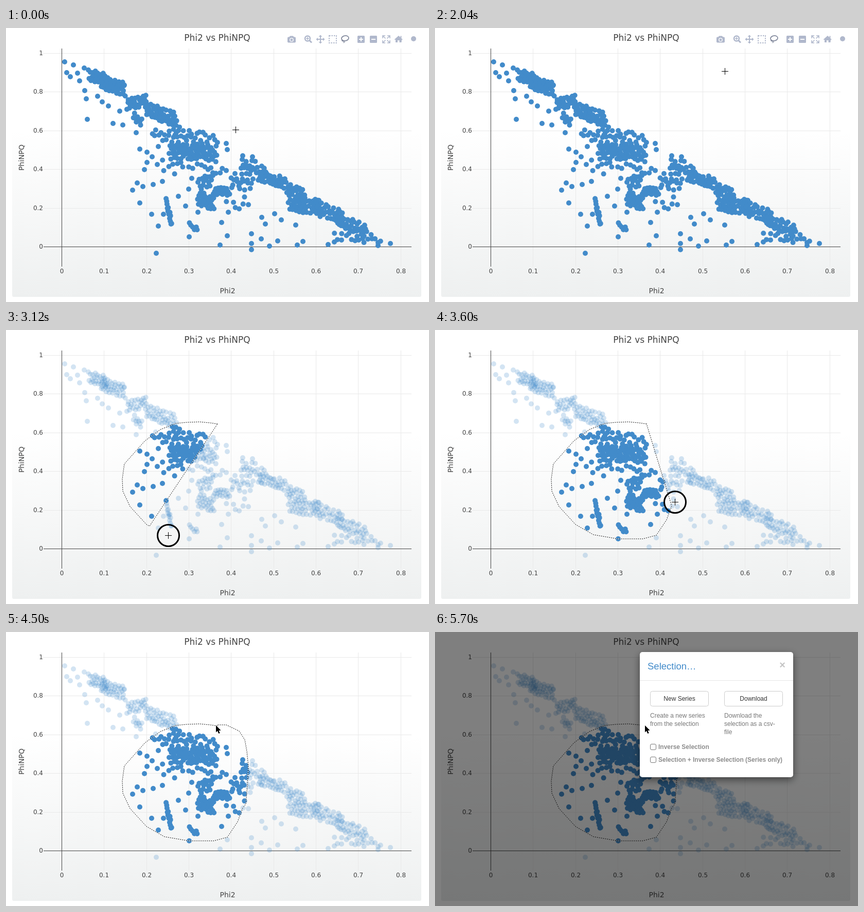
Recreate the animation shown at these times as an HTML page with a canvas. Size 822x534 px, loop 5.76 s.

```html
<!DOCTYPE html>
<html lang="en">
<head>
<meta charset="utf-8">
<title>Phi2 vs PhiNPQ</title>
<style>
  html, body { margin: 0; width: 100%; height: 100%; overflow: hidden; background: #fff; }
  canvas { display: block; }
</style>
</head>
<body>
<canvas id="stage" width="822" height="534"></canvas>
<script>
const ctx = document.getElementById('stage').getContext('2d');
const W = 822, H = 534, LOOP = 5760, STEP = 60;
const BLUE = '#428bca', ICON = '#b0b8cc', ICON_ON = '#858c9f';
const PLOT_FONT = '"DejaVu Sans", Verdana, sans-serif';
const UI_FONT = '"Liberation Sans", Arial, sans-serif';
const PRESS = 2460, DIM = 2520, RELEASE = 4260, DIALOG = 4560;

// isolated points: x, y
const loners = [
  114,66, 118,87, 125,95, 131,72, 139,88, 143,103, 152,78, 153,122, 156,138,
  158,178, 178,133, 187,144, 199,152, 208,186, 227,189, 221,162, 228,122,
  253,204, 260,236, 246,316, 255,302, 266,309, 260,341, 269,276, 274,242,
  274,262, 283,363, 292,439, 296,386, 286,305, 284,251, 296,231, 294,266,
  304,299, 306,363, 335,328, 349,347, 355,314, 356,407, 361,293, 373,359,
  416,423, 419,379, 430,405, 430,237, 428,225, 460,249, 479,251, 477,401,
  477,420, 477,432, 496,411, 512,425, 528,415, 497,369, 504,382, 522,362,
  535,374, 563,384, 566,423, 577,416, 626,422, 638,417, 723,424, 747,420
];

// clouds along a segment: x0, y0, x1, y1, half height, count
const clouds = [
  [160, 90, 198, 102, 11, 26], [184, 104, 232, 120, 13, 36],
  [234, 148, 272, 142, 11, 22], [247, 168, 264, 186, 9, 9],
  [270, 155, 332, 180, 14, 44], [283, 208, 335, 213, 11, 14],
  [325, 202, 412, 225, 14, 30], [316, 243, 385, 240, 15, 46],
  [382, 240, 410, 252, 14, 16], [300, 271, 430, 272, 16, 21],
  [373, 302, 402, 300, 13, 16], [372, 330, 405, 342, 14, 24],
  [402, 320, 435, 318, 8, 17], [436, 300, 480, 300, 17, 21],
  [311, 332, 322, 378, 10, 14], [425, 351, 475, 338, 12, 8],
  [455, 264, 502, 278, 13, 20], [490, 287, 542, 302, 11, 32],
  [544, 314, 582, 328, 14, 26], [548, 342, 612, 354, 14, 32],
  [596, 346, 655, 370, 15, 32], [642, 372, 702, 396, 12, 32],
  [636, 406, 732, 412, 9, 18], [354, 380, 373, 392, 6, 6]
];

// lasso drag: x, y, time
const drag = [
  [411, 183, 2480], [397, 181, 2580], [376, 179, 2608], [351, 180, 2640],
  [330, 182, 2668], [300, 194, 2710], [270, 216, 2760], [230, 261, 2840],
  [226, 290, 2885], [227, 314, 2925], [241, 344, 2975], [273, 379, 3050],
  [308, 399, 3110], [355, 407, 3180], [404, 407, 3260], [430, 400, 3330],
  [450, 370, 3440], [460, 343, 3540], [466, 335, 3600], [469, 300, 3720],
  [471, 262, 3840], [468, 232, 3920], [464, 210, 3980], [453, 193, 4040],
  [428, 181, 4110], [411, 181, 4180]
];
const pointer = [
  [446, 198, 0], [446, 198, 120], [627, 57, 600], [658, 22, 840],
  [658, 22, 1840], [411, 183, 2360], ...drag
];

let seed = 77;
function rand() {
  seed = (seed * 16807) % 2147483647;
  return seed / 2147483647;
}

function makePoints() {
  const pts = [];
  for (let i = 0; i < loners.length; i += 2) pts.push([loners[i], loners[i + 1]]);
  for (const [x0, y0, x1, y1, h, n] of clouds) {
    for (let i = 0; i < n; i++) {
      let p;
      for (let tries = 0; tries < 12; tries++) {
        const u = (i + rand()) / n;
        p = [x0 + (x1 - x0) * u, y0 + (y1 - y0) * u + (rand() * 2 - 1) * h];
        if (pts.every(q => Math.hypot(q[0] - p[0], q[1] - p[1]) > 5)) break;
      }
      pts.push(p);
    }
  }
  return pts;
}
const points = makePoints();

function along(keys, t) {
  if (t <= keys[0][2]) return keys[0];
  for (let i = 1; i < keys.length; i++) {
    const a = keys[i - 1], b = keys[i];
    if (t <= b[2]) {
      const u = (t - a[2]) / (b[2] - a[2]);
      return [a[0] + (b[0] - a[0]) * u, a[1] + (b[1] - a[1]) * u];
    }
  }
  return keys[keys.length - 1];
}

function lassoAt(t) {
  const late = t - STEP * (t < RELEASE ? 1 : 0);
  return [...drag.filter(k => k[2] < late), along(drag, late)];
}

function trace(pts) {
  const path = new Path2D();
  pts.forEach((p, i) => i ? path.lineTo(p[0], p[1]) : path.moveTo(p[0], p[1]));
  path.closePath();
  return path;
}

function text(str, x, y, size, color, family = PLOT_FONT, align = 'left', weight = '') {
  ctx.font = `${weight} ${size}px ${family}`;
  ctx.fillStyle = color;
  ctx.textAlign = align;
  ctx.fillText(str, x, y);
}

function box(x, y, w, h, r, fill, stroke) {
  ctx.beginPath();
  ctx.roundRect(x, y, w, h, r);
  if (fill) { ctx.fillStyle = fill; ctx.fill(); }
  if (stroke) { ctx.strokeStyle = stroke; ctx.lineWidth = 1; ctx.stroke(); }
}

function rect(x, y, w, h, color) {
  ctx.fillStyle = color;
  ctx.fillRect(x, y, w, h);
}

function backdrop() {
  rect(0, 0, W, H, '#fff');
  const g = ctx.createLinearGradient(0, 200, 0, 524);
  g.addColorStop(0, '#fff');
  g.addColorStop(1, '#eef0f0');
  box(12, 8, 795, 516, 3, g);
}

function axes() {
  const gx = i => Math.round(108 + i * 82.33), gy = i => Math.round(426 - i * 75.5);
  for (let i = 1; i <= 8; i++) rect(gx(i), 40, 1, 425, '#e9e9e9');
  for (let i = 1; i <= 5; i++) rect(73, gy(i), 715, 1, '#e9e9e9');
  rect(108, 40, 1, 425, '#444');
  rect(73, 426, 715, 1, '#444');
  for (let i = 0; i <= 8; i++) text(String(i / 10), gx(i) + 0.5, 478, 12, '#444', PLOT_FONT, 'center');
  for (let i = 0; i <= 5; i++) text(String(i / 5), 72, gy(i) + 4, 12, '#444', PLOT_FONT, 'right');
  text('Phi2 vs PhiNPQ', 410.5, 25, 17, '#444', PLOT_FONT, 'center');
  text('Phi2', 430.5, 517, 14, '#444', PLOT_FONT, 'center');
  ctx.save();
  ctx.translate(35, 252.5);
  ctx.rotate(-Math.PI / 2);
  text('PhiNPQ', 0, 0, 14, '#444', PLOT_FONT, 'center');
  ctx.restore();
}

function dots(t, area) {
  ctx.fillStyle = BLUE;
  for (const [x, y] of points) {
    const lit = t < DIM || ctx.isPointInPath(area, x, y);
    ctx.globalAlpha = lit ? 1 : 0.23;
    ctx.beginPath();
    ctx.arc(x, y, 5, 0, 7);
    ctx.fill();
  }
  ctx.globalAlpha = 1;
}

function stroke(color, width, draw) {
  ctx.strokeStyle = color;
  ctx.lineWidth = width;
  ctx.beginPath();
  draw();
  ctx.stroke();
}

function arrowHeads(cx, cy, far, near, half) {
  ctx.fillStyle = ICON;
  for (let i = 0; i < 4; i++) {
    ctx.save();
    ctx.translate(cx, cy);
    ctx.rotate(i * Math.PI / 2);
    ctx.fill(trace([[0, -far], [half, -near], [-half, -near]]));
    ctx.restore();
  }
}

function toolbar(alpha) {
  ctx.globalAlpha = alpha;
  // camera
  box(547, 17.5, 16, 11, 2, ICON);
  box(551, 15.5, 8, 4, 1.5, ICON);
  stroke('#fff', 1.3, () => ctx.arc(555, 23, 3.2, 0, 7));
  // zoom
  stroke(ICON, 2.5, () => ctx.arc(586, 20.5, 5, 0, 7));
  stroke(ICON, 3, () => { ctx.moveTo(590, 24.5); ctx.lineTo(594, 28.5); });
  rect(583, 19.7, 6, 1.6, ICON);
  rect(585.2, 17.5, 1.6, 6, ICON);
  // pan
  rect(610, 16, 2, 12, ICON);
  rect(605, 21, 12, 2, ICON);
  arrowHeads(611, 22, 8.5, 5, 3.3);
  // box select
  ctx.setLineDash([2.5, 2]);
  stroke(ICON, 2, () => ctx.rect(628, 15, 14, 14));
  ctx.setLineDash([]);
  // lasso
  stroke(ICON_ON, 1.8, () => ctx.ellipse(659, 20, 7, 5, -0.15, 0, 7));
  stroke(ICON_ON, 1.6, () => {
    ctx.moveTo(653, 22);
    ctx.quadraticCurveTo(652, 26, 656, 25.5);
    ctx.quadraticCurveTo(658.5, 27, 656, 29);
  });
  // zoom in and out
  for (const x of [683, 707]) {
    box(x, 15, 14, 14, 1.5, ICON);
    rect(x + 3, 21, 8, 2, '#fff');
  }
  rect(689, 18, 2, 8, '#fff');
  // autoscale
  stroke(ICON, 1.6, () => {
    for (const [sx, sy] of [[-1, -1], [1, -1], [1, 1], [-1, 1]]) {
      const x = 739 + sx * 7, y = 22 + sy * 7;
      ctx.moveTo(x - sx * 5, y); ctx.lineTo(x, y); ctx.lineTo(x, y - sy * 5);
      ctx.moveTo(x, y); ctx.lineTo(739 + sx * 1.5, 22 + sy * 1.5);
    }
  });
  // home
  ctx.fillStyle = ICON;
  ctx.fill(trace([[754.5, 22.5], [763, 15], [771, 22.5], [769, 23], [768.5, 28], [764.5, 28],
    [764.5, 24], [761, 24], [761, 28], [757, 28], [757, 23]]));
  rect(766.5, 15.5, 2, 4, ICON);
  // badge
  ctx.beginPath();
  ctx.arc(792, 21, 5, 0, 7);
  ctx.fill();
  ctx.globalAlpha = 1;
}

function tooltip() {
  box(582, 37, 95, 28, 2, '#636c83');
  ctx.fill(trace([[659, 32], [664, 37.5], [654, 37.5]]));
  text('Lasso Select', 592, 55, 12, '#fff');
}

function outline(area) {
  stroke('#fff', 1, () => {});
  ctx.stroke(area);
  ctx.setLineDash([2, 2]);
  ctx.strokeStyle = '#000';
  ctx.stroke(area);
  ctx.setLineDash([]);
}

function cross(x, y) {
  rect(x - 6, y, 13, 1, '#000');
  rect(x, y - 6, 1, 13, '#000');
}

function glyph(x, y, pts, fill, edge, width) {
  ctx.save();
  ctx.translate(x, y);
  ctx.lineJoin = 'round';
  const path = trace(pts);
  ctx.strokeStyle = edge;
  ctx.lineWidth = width;
  ctx.stroke(path);
  ctx.fillStyle = fill;
  ctx.fill(path);
  ctx.restore();
}

function hand(x, y) {
  glyph(x, y, [[0, 1], [1.5, 0], [3, 1], [4.5, 6], [6, 5.2], [7.5, 6], [9, 5.4], [10.3, 6.6],
    [12, 6.4], [13, 8], [13, 12], [11.5, 16], [4.5, 16], [2, 12.5], [-2.5, 9.5], [-2.5, 8],
    [-0.8, 7.6], [2, 9.2]], '#fff', '#000', 2);
  stroke('#000', 0.9, () => {
    for (const dx of [5, 7.5, 10]) {
      ctx.moveTo(x + dx, y + 10);
      ctx.lineTo(x + dx + 0.3, y + 13.5);
    }
  });
}

function arrow(x, y) {
  glyph(x, y, [[0, 0], [0, 13.5], [3, 10.7], [5.3, 16], [7.7, 15], [5.5, 9.9], [9.6, 9.7]],
    '#000', '#fff', 1.6);
}

function dialog() {
  rect(0, 0, W, H, 'rgba(0,0,0,.5)');
  ctx.save();
  ctx.shadowColor = 'rgba(0,0,0,.5)';
  ctx.shadowBlur = 15;
  ctx.shadowOffsetY = 5;
  box(398, 39, 298, 244, 5, '#fff');
  ctx.restore();
  rect(398, 94, 298, 1, '#e5e5e5');
  text('Selection…', 413, 73, 18.5, BLUE, UI_FONT);
  text('×', 675, 71, 20, '#c4c4c4', UI_FONT, 'center', 'bold');
  for (const [x, label] of [[418, 'New Series'], [562, 'Download']]) {
    box(x + 0.5, 115.5, 113, 29, 4, '#fff', '#ccc');
    text(label, x + 57, 134, 12, '#333', UI_FONT, 'center');
  }
  ['Create a new series', 'from the selection'].forEach((s, i) =>
    text(s, 418, 167 + i * 16, 12, '#777', UI_FONT));
  ['Download the', 'selection as a csv-', 'file'].forEach((s, i) =>
    text(s, 562, 167 + i * 16, 12, '#777', UI_FONT));
  ['Inverse Selection', 'Selection + Inverse Selection (Series only)'].forEach((s, i) => {
    box(418.5, 218.5 + i * 25, 11, 11, 2.5, '#fff', '#777');
    text(s, 434, 228 + i * 25, 12, '#8c8c8c', UI_FONT, 'left', 'bold');
  });
}

function cursor(t) {
  const [x, y] = along(pointer, t).map(Math.round);
  const click = t >= 1440 && t < 1620;
  if (click || (t >= PRESS && t < RELEASE)) {
    stroke('#000', 3, () => ctx.arc(x + 0.5, y + 0.5, 21, 0, 7));
  }
  if (t >= RELEASE) arrow(408, 182);
  else if (y < 32) hand(x, y);
  else cross(x, y);
  return y;
}

function render(t) {
  const pts = t >= PRESS ? lassoAt(t) : [];
  const area = trace(pts);
  backdrop();
  axes();
  dots(t, area);
  if (t < 2940) toolbar(Math.min(1, (2940 - t) / 240));
  if (along(pointer, t)[1] < 32) tooltip();
  if (pts.length > 1) outline(area);
  if (t >= DIALOG) dialog();
  cursor(t);
}

const start = performance.now();
function tick() {
  const t = (performance.now() - start) % LOOP;
  render(Math.floor(t / STEP) * STEP);
  requestAnimationFrame(tick);
}
tick();
</script>
</body>
</html>
```
